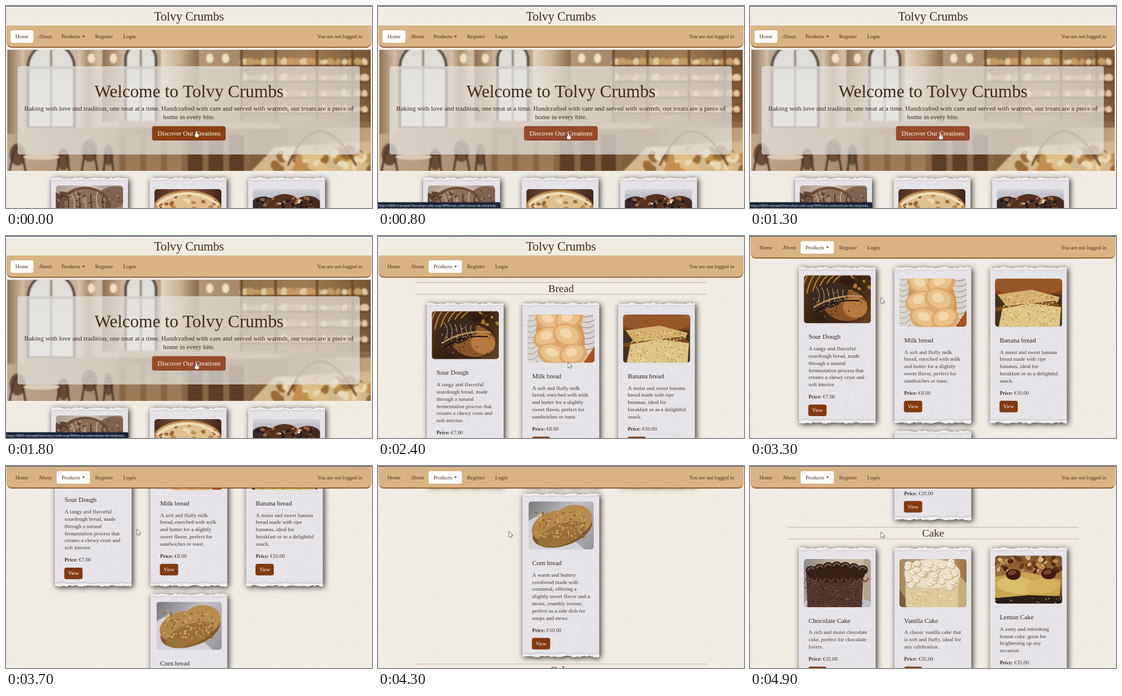
Animation of 600x332 px, one loop 5 s. Source, as an HTML page with a canvas:

```html
<!DOCTYPE html>
<html lang="en">
<head>
<meta charset="utf-8">
<title>Tolvy Crumbs</title>
<style>
html, body { margin: 0; width: 100%; height: 100%; overflow: hidden; background: #f1ede5; }
canvas { display: block; width: 600px; height: 332px; }
</style>
</head>
<body>
<canvas id="stage" width="600" height="332"></canvas>
<script>
const W = 600, H = 332, LOOP = 5000, STEP = 100;
const SERIF = '"Liberation Serif", "Noto Serif", serif';
const SANS = '"Open Sans", "Noto Sans", sans-serif';
const DARK = '#412a1a', BODY = '#463a33';
const BRAND = 'Tolvy Crumbs';
const ctx = document.getElementById('stage').getContext('2d');

let seed = 7;
const rnd = () => (seed = (seed * 16807) % 2147483647) / 2147483647;
const span = (a, b) => a + (b - a) * rnd();

function layer(h, draw) {
  const cv = document.createElement('canvas');
  cv.width = W;
  cv.height = h;
  draw(cv.getContext('2d'));
  return cv;
}

function text(c, str, x, y, size, color = BODY, align = 'left', weight = '', family = SERIF) {
  c.font = `${weight} ${size}px ${family}`;
  c.fillStyle = color;
  c.textAlign = align;
  c.fillText(str, x, y);
}

function box(c, x, y, w, h, color, r = 0) {
  c.beginPath();
  c.roundRect(x, y, w, h, r);
  c.fillStyle = color;
  c.fill();
}

function blob(c, x, y, rx, ry, color, turn = 0) {
  c.beginPath();
  c.ellipse(x, y, rx, ry, turn, 0, 7);
  c.fillStyle = color;
  c.fill();
}

function curve(c, color, width, x0, y0, cx, cy, x1, y1) {
  c.beginPath();
  c.moveTo(x0, y0);
  c.quadraticCurveTo(cx, cy, x1, y1);
  c.strokeStyle = color;
  c.lineWidth = width;
  c.stroke();
}

function poly(c, color, ...p) {
  c.beginPath();
  for (let i = 0; i < p.length; i += 2) c.lineTo(p[i], p[i + 1]);
  c.closePath();
  c.fillStyle = color;
  c.fill();
}

function fade(c, x0, y0, x1, y1, ...colors) {
  const g = c.createLinearGradient(x0, y0, x1, y1);
  colors.forEach((k, i) => g.addColorStop(i / (colors.length - 1), k));
  return g;
}

function specks(c, n, x, y, w, h, size, ...colors) {
  for (let i = 0; i < n; i++) {
    const r = span(size / 2, size);
    blob(c, x + w * rnd(), y + h * rnd(), r, r * .7, colors[i % colors.length], rnd() * 3);
  }
}

function grain(c, n, x, y, w, h, alpha) {
  for (let i = 0; i < n; i++) {
    c.fillStyle = i % 2 ? `rgba(90,75,60,${alpha})` : `rgba(255,255,255,${alpha * 4})`;
    c.fillRect(x + Math.floor(rnd() * w), y + Math.floor(rnd() * h), 1, 1);
  }
}

// Pictures, each painted in a 110 x 79 area
const pics = {
  sour(c) {
    box(c, 0, 0, 110, 79, fade(c, 0, 0, 110, 79, '#5a3718', '#2f1c10', '#6b4522'));
    for (let i = 0; i < 6; i++) curve(c, '#b5853c', 2, i * 9 - 4, 30, i * 9, 10, i * 11 + 6, 0);
    specks(c, 14, 80, 0, 30, 24, 5, '#a87832', '#4a2c14');
    blob(c, 57, 46, 49, 32, '#3a2415', .15);
    blob(c, 68, 49, 37, 26, '#8a5527', .15);
    blob(c, 84, 53, 20, 17, '#b57b3c', .2);
    blob(c, 40, 34, 34, 20, '#38291f', -.35);
    for (let i = 0; i < 6; i++) curve(c, '#a59076', 1.2, 20 + i * 9, 19 + i, 30 + i * 6, 30, 22 + i * 10, 46);
    curve(c, '#c29560', 2.5, 16, 53, 52, 30, 96, 35);
    curve(c, '#1d120b', 2, 20, 60, 50, 38, 92, 42);
    specks(c, 60, 12, 24, 92, 48, 1.4, '#c59257', '#2a1a10');
  },
  milk(c) {
    box(c, 0, 0, 110, 79, '#d9d5d0');
    for (let i = 0; i < 10; i++) {
      curve(c, '#99958f', 1.2, 86, i * 9 - 8, 100, i * 9 - 2, 110, i * 9 - 10);
      curve(c, '#aaa59e', 1.2, 0, i * 9, 8, i * 9 + 6, 18, i * 9 - 6);
    }
    poly(c, '#a8521f', 92, 79, 110, 52, 110, 79);
    blob(c, 54, 38, 39, 53, '#cf9658', -.25);
    [[36, 10, 25, 17, .5], [68, 8, 24, 18, -.4], [34, 38, 25, 18, -.3], [66, 35, 25, 20, .4],
     [43, 66, 27, 18, .3], [75, 66, 23, 18, -.3]].forEach(([x, y, a, b, t]) => {
      blob(c, x, y, a, b, '#dca86b', t);
      blob(c, x - 1, y - 2, a * .8, b * .75, '#e9c08a', t);
      blob(c, x - 3, y - 4, a * .4, b * .4, '#f2d6ac', t);
    });
  },
  banana(c) {
    box(c, 0, 0, 110, 79, '#43301f');
    box(c, 0, 0, 110, 26, fade(c, 0, 0, 0, 28, '#a5622e', '#733a18'));
    blob(c, 55, 12, 58, 16, '#95562a');
    poly(c, '#d4b16b', 4, 26, 60, 18, 106, 30, 98, 50, 20, 47);
    poly(c, '#7d4a20', 0, 47, 98, 36, 110, 47, 110, 53, 0, 53);
    poly(c, '#dfc485', 12, 49, 60, 40, 108, 47, 106, 79, 6, 79);
    specks(c, 110, 12, 26, 84, 20, 1.7, '#e8d398', '#b58c48');
    specks(c, 120, 12, 50, 90, 28, 1.7, '#efdca8', '#bf9854');
  },
  corn(c) {
    box(c, 0, 0, 110, 79, fade(c, 0, 0, 110, 79, '#77777a', '#c4c2c6', '#959297'));
    poly(c, '#d3d1d6', 0, 32, 22, 20, 95, 79, 0, 79);
    blob(c, 57, 46, 52, 27, '#7f5a2a', -.3);
    blob(c, 40, 40, 36, 23, '#b18647', -.35);
    blob(c, 74, 31, 34, 25, '#b88c4c', -.25);
    blob(c, 56, 54, 42, 17, '#98703a', -.35);
    specks(c, 150, 12, 16, 86, 44, 2.4, '#cba564', '#8c652e', '#bb9150');
  },
  choc(c) {
    box(c, 0, 0, 110, 79, fade(c, 0, 0, 110, 40, '#8d8986', '#c3b8aa', '#d2bda0'));
    box(c, 98, 0, 12, 79, '#b5a28d');
    blob(c, 55, 76, 60, 14, '#bfc1c5');
    poly(c, '#4f352c', 4, 24, 98, 22, 95, 79, 6, 79);
    specks(c, 200, 0, 32, 96, 46, 1.4, '#8a4a34', '#526173', '#2f1d19');
    blob(c, 53, 26, 47, 13, '#382019');
    for (let i = 0; i < 7; i++) {
      const x = 12 + i * 14, y = 19 - Math.sin(i * .5) * 7;
      blob(c, x, y, 9, 8, '#33201b');
      curve(c, '#7d5e50', 2, x - 6, y, x, y - 9, x + 6, y - 1);
      curve(c, '#6c4433', 2, x, 32, x + 5, 42, x + 10, 31);
    }
  },
  vanilla(c) {
    box(c, 0, 0, 110, 79, fade(c, 0, 0, 110, 0, '#a68761', '#d0b68b', '#9a7447'));
    poly(c, '#7d5d3a', 0, 50, 20, 79, 0, 79);
    poly(c, '#c8ac7d', 90, 18, 110, 40, 110, 79, 88, 79);
    box(c, 10, 22, 86, 60, '#dcc99c', 8);
    blob(c, 54, 24, 46, 24, '#e9dfc5');
    for (let i = 0; i < 44; i++) {
      const x = span(14, 94), y = span(3, 48);
      blob(c, x, y, 6, 5, '#cdb98e');
      blob(c, x - 1, y - 1, 5, 4, '#f3ebd8');
      curve(c, '#bda77a', .7, x - 3, y, x, y - 4, x + 2, y + 1);
    }
    specks(c, 60, 14, 48, 78, 30, 2, '#eadfbd', '#cdb583');
  },
  lemon(c) {
    box(c, 0, 0, 110, 79, fade(c, 0, 0, 0, 79, '#7a5030', '#a6793f', '#2e2018'));
    poly(c, '#cba552', 0, 35, 50, 27, 108, 40, 106, 66, 0, 72);
    blob(c, 36, 49, 33, 14, '#dcbd6c', .1);
    blob(c, 78, 50, 28, 12, '#d4b25d', -.1);
    poly(c, '#2b1d17', 0, 70, 55, 65, 110, 67, 110, 79, 0, 79);
    specks(c, 44, 0, 0, 110, 28, 6, '#6d3c1c', '#b98a4c', '#4b2714', '#d3b27a');
    [[30, 31], [88, 30]].forEach(([x, y]) => {
      blob(c, x, y, 12, 9, '#3d1b0e');
      blob(c, x - 2, y - 3, 7, 4, '#7b4325', -.3);
    });
    specks(c, 26, 0, 68, 110, 10, 2, '#8a6a45', '#16100d');
  },
  cookies(c) {
    box(c, 0, 0, 110, 79, fade(c, 0, 0, 110, 0, '#a99a8c', '#cfc5b9', '#8f8071'));
    blob(c, 92, 20, 26, 18, '#7d6350', -.2);
    blob(c, 10, 30, 20, 20, '#5d4434');
    blob(c, 48, 34, 42, 32, '#6d4f3b');
    blob(c, 48, 30, 34, 24, '#8d6f58');
    for (let i = 0; i < 7; i++) curve(c, i % 2 ? '#c0a68d' : '#4d3425', 1.8, 14 + i * 11, 18 - i % 3 * 4, 24 + i * 8, 20, 20 + i * 10, 44);
    specks(c, 60, 0, 8, 110, 34, 2, '#4a3224', '#b39a83');
  },
  pie(c) {
    box(c, 0, 0, 110, 79, fade(c, 0, 0, 110, 0, '#4a2c20', '#7d5a42', '#3e2419'));
    blob(c, 54, 32, 56, 30, '#bd8a50');
    blob(c, 54, 27, 50, 22, '#dfbf91');
    specks(c, 22, 10, 10, 90, 26, 5, '#9a6534', '#edd7b3', '#c08c50');
    curve(c, '#efdcba', 4, 4, 26, 54, -12, 106, 26);
  },
  muffins(c) {
    box(c, 0, 0, 110, 79, fade(c, 0, 0, 0, 36, '#d3d5da', '#8b8f9c'));
    blob(c, 18, 32, 24, 20, '#3a2a2a');
    blob(c, 52, 28, 26, 20, '#54301f');
    blob(c, 90, 31, 24, 20, '#41291f');
    specks(c, 46, 4, 14, 100, 20, 4, '#1d1a22', '#9a633b', '#5d3823');
    specks(c, 10, 20, 12, 70, 12, 3, '#c39a72', '#e2d6cb');
  }
};

function photo(c, name, x, y, w = 110) {
  c.save();
  c.beginPath();
  c.roundRect(x, y, w, 79, 5);
  c.clip();
  c.translate(x, y);
  c.scale(w / 110, 1);
  pics[name](c);
  c.restore();
}

// Uneven ripple of a torn edge
const tear = x => Math.sin(x * .19 + 1) * .7 + Math.sin(x * .43 + 2 * Math.sin(x * .11)) * .6 + Math.sin(x * 1.37 + Math.sin(x * .3)) * .4;

function edge(c, x, y, w, dy) {
  c.beginPath();
  for (let i = 0; i <= w; i++) c.lineTo(x + i, y + dy + tear(x + i + dy * 5));
}

function paper(c, x, y, w, h) {
  c.save();
  c.beginPath();
  for (let i = 0; i <= w; i++) c.lineTo(x + i, y + tear(x + i));
  for (let i = w; i >= 0; i--) c.lineTo(x + i, y + h + tear(x + i + 9));
  c.closePath();
  c.fillStyle = '#e6e4e8';
  c.shadowColor = 'rgba(20,16,14,.9)';
  c.shadowBlur = 10;
  c.shadowOffsetX = c.shadowOffsetY = 2;
  c.fill();
  c.shadowColor = 'transparent';
  c.clip();
  grain(c, 5000, x, y, w, h, .06);
  [[0, 4, '#f3f2f1'], [4, .8, '#c3c1c3'], [h, 5, '#f3f2f1'], [h - 5, 1, '#bab8ba']].forEach(([dy, lw, col]) => {
    edge(c, x, y, w, dy);
    c.lineWidth = lw;
    c.strokeStyle = col;
    c.stroke();
  });
  c.restore();
}

function button(c, x, y, w, h, color) {
  box(c, x, y, w, h, '#7a3a14', 3.5);
  box(c, x + .7, y + .7, w - 1.4, h - 1.4, color, 3);
}

// y is the top of the picture
function card(c, x, y, top, h, pic, title, price, lines) {
  paper(c, x, top, 126, h);
  if (pic === 'corn') photo(c, pic, x + 10, y, 107);
  else photo(c, pic, x + 8.2, y);
  const tx = x + 16, rows = lines.split('|');
  text(c, title, tx, y + 104.5, 10.8, '#2f2521');
  rows.forEach((s, i) => text(c, s, tx, y + 123.3 + i * 11.9, 8.95));
  const py = y + 131 + rows.length * 11.9;
  text(c, 'Price:', tx, py, 8.4, '#3a2c25', 'left', 'bold');
  text(c, price, tx + c.measureText('Price: ').width, py, 8.8);
  button(c, tx - .5, py + 10, 30, 19, '#83390f');
  text(c, 'View', tx + 14.5, py + 22.5, 8.4, '#fff', 'center');
}

function section(c, name, y) {
  [y, y + 19.5].forEach(v => box(c, 61, v, 478, .8, '#b3a38e'));
  text(c, name, 300, y + 16, 17.6, DARK, 'center');
}

const heading = c => text(c, BRAND, 300, 24, 20, DARK, 'center');

function archWindow(c, x, w) {
  box(c, x, 60, w, 140, '#54483d', [w / 2, w / 2, 0, 0]);
  box(c, x + 4, 64, w - 8, 134, fade(c, 0, 70, 0, 198, '#dcdbd5', '#f1f0ec'), [w / 2, w / 2, 0, 0]);
  box(c, x + w / 2 - 1.5, 64, 3, 134, '#8a7d6e');
  box(c, x, 100, w, 3, '#8a7d6e');
}

function interior(c) {
  box(c, 0, 70, W, 204, fade(c, 0, 0, W, 0, '#b9a48d', '#cdbca6', '#b59a7c', '#9c7a58', '#8a6848'));
  box(c, 0, 200, W, 74, fade(c, 0, 0, W, 0, '#bfa88e', '#a98c6e', '#7f5a3a', '#85603e', '#c4a57c'));
  box(c, 2, 70, 28, 140, fade(c, 2, 0, 30, 0, '#8d7157', '#d6c3a8'));
  archWindow(c, 34, 80);
  archWindow(c, 194, 54);
  box(c, 118, 70, 34, 130, fade(c, 118, 0, 152, 0, '#d9c9b2', '#a98c6c', '#d4c0a4'));
  box(c, 158, 70, 30, 120, fade(c, 158, 0, 188, 0, '#8f7052', '#c4a98a'));
  box(c, 254, 70, 62, 125, fade(c, 254, 0, 316, 0, '#e4d7c2', '#c8b08e', '#8b6a49'));
  [140, 176, 334, 360].forEach(x => blob(c, x, 86, 6, 8, '#efe0c0'));
  box(c, 384, 70, 214, 120, fade(c, 384, 0, 598, 0, '#90704f', '#a07b53', '#7a5535'));
  [97, 123, 149, 175].forEach(y => {
    for (let x = 390; x < 598; x += 11) blob(c, x, y - 5, span(4, 8), span(4, 8), x % 3 ? '#c59a64' : '#e2c8a0', span(-.4, .4));
    box(c, 384, y, 214, 3, '#66472b');
  });
  [384, 440, 508, 566].forEach(x => box(c, x, 70, 4, 120, '#6a4a2e'));
  poly(c, '#8a6544', 186, 188, 400, 200, 400, 274, 186, 274);
  poly(c, '#b3977a', 186, 188, 450, 194, 450, 202, 186, 200);
  for (let x = 196; x < 400; x += 34) box(c, x, 212, 24, 62, x > 290 ? '#5d3d24' : '#9d7a58');
  [[6, 232, 26], [84, 240, 20], [124, 226, 26], [160, 232, 16]].forEach(([x, y, w]) => {
    blob(c, x + w / 2, y + 12, w / 2, 18, '#6a4c35');
    curve(c, '#4b3424', 3, x, 272, x + w / 2, y - 40, x + w, 272);
  });
  blob(c, 58, 248, 30, 5, '#d9cbb8');
  poly(c, '#d2b78f', 400, 274, 440, 232, 598, 222, 598, 274);
  specks(c, 50, 440, 236, 158, 36, 12, '#c1904f', '#dfbd86', '#9a6a38', '#ead7b5');
  curve(c, '#5a4534', 3, 462, 262, 512, 150, 574, 262);
}

function hero(c) {
  c.save();
  c.beginPath();
  c.rect(2, 72, 596, 199);
  c.clip();
  c.filter = 'blur(1.2px)';
  c.drawImage(layer(H, interior), 0, 0);
  c.restore();
  box(c, 19, 99, 561, 145, 'rgba(228,226,224,.72)', 4);
  text(c, 'Welcome to ' + BRAND, 300, 150, 28.8, DARK, 'center');
  text(c, 'Baking with love and tradition, one treat at a time. Handcrafted with care and served with warmth, our treats are a piece of', 300, 171.5, 11.03, '#3d2a20', 'center');
  text(c, 'home in every bite.', 300, 186, 11.03, '#3d2a20', 'center');
}

const back = layer(H, c => {
  box(c, 0, 0, W, H, '#f0ece4');
  grain(c, 20000, 0, 0, W, H, .025);
});

const home = layer(H, c => {
  heading(c);
  hero(c);
  [['cookies', 74, 295], ['pie', 235.5, 301], ['muffins', 397, 301]].forEach(([pic, x, y]) => {
    paper(c, x, 283, 126, 90);
    photo(c, pic, x + 7.7, y);
  });
});

const shop = layer(920, c => {
  heading(c);
  section(c, 'Bread', 76);
  card(c, 80, 123.5, 111, 255, 'sour', 'Sour Dough', '€7.00', 'A tangy and flavorful|sourdough bread, made|through a natural|fermentation process that|creates a chewy crust and|soft interior.');
  card(c, 236.8, 129.2, 111, 255, 'milk', 'Milk bread', '€8.00', 'A soft and fluffy milk|bread, enriched with milk|and butter for a slightly|sweet flavor, perfect for|sandwiches or toast.');
  card(c, 393.5, 129.2, 111, 255, 'banana', 'Banana bread', '€10.00', 'A moist and sweet banana|bread made with ripe|bananas, ideal for|breakfast or as a delightful|snack.');
  card(c, 236.8, 392.3, 380, 267, 'corn', 'Corn bread', '€10.00', 'A warm and buttery|cornbread made with|cornmeal, offering a|slightly sweet flavor and a|moist, crumbly texture,|perfect as a side dish for|soups and stews.');
  section(c, 'Cake', 659);
  card(c, 80, 712, 694, 240, 'choc', 'Chocolate Cake', '€35.00', 'A rich and moist chocolate|cake, perfect for chocolate|lovers.');
  card(c, 236.8, 712, 694, 240, 'vanilla', 'Vanilla Cake', '€35.00', 'A classic vanilla cake that|is soft and fluffy, ideal for|any celebration.');
  card(c, 393.5, 706.3, 694, 240, 'lemon', 'Lemon Cake', '€35.00', 'A zesty and refreshing|lemon cake, great for|brightening up any|occasion.');
});

function navbar(c, y, active) {
  box(c, 1.5, y, 597, 36.5, '#8a4b1d', [0, 0, 8, 8]);
  box(c, 1.5, y, 597, 35, '#d9b384', [0, 0, 8, 8]);
  if (active === 'Home') box(c, 7.5, y + 8, 37.5, 20.5, '#fffdfa', 3);
  else box(c, 83, y + 8, 54.5, 20.5, '#fffdfa', 3);
  [['Home', 15.5], ['About', 53.5], ['Products', 91], ['Register', 146], ['Login', 192]]
    .forEach(([s, x]) => text(c, s, x, y + 21, 8.75, '#4b301f'));
  poly(c, '#4b301f', 124.8, y + 17, 129.4, y + 17, 127.1, y + 19.4);
  text(c, 'You are not logged in', 584, y + 21, 8.6, '#4b301f', 'right');
}

function pointer(c, x, y, shape) {
  c.save();
  c.translate(x, y);
  c.beginPath();
  if (shape === 'hand') {
    c.roundRect(-1.2, 0, 2.2, 7, 1);
    c.roundRect(-2.6, 4, 6.4, 5.5, 2);
  } else {
    [[0, 0], [0, 8.2], [1.9, 6.6], [3.1, 9.2], [4.4, 8.6], [3.2, 6.1], [5.6, 5.9]].forEach(p => c.lineTo(...p));
    c.closePath();
  }
  c.strokeStyle = '#4d4a4a';
  c.lineWidth = 1.2;
  c.stroke();
  c.fillStyle = '#fff';
  c.fill();
  c.restore();
}

// Linear track through [time, value] pairs
function track(t, keys) {
  for (let i = 1; i < keys.length; i++) {
    const [a, u] = keys[i - 1], [b, v] = keys[i];
    if (t <= b) return u + (v - u) * Math.max(0, (t - a) / (b - a));
  }
  return keys[keys.length - 1][1];
}

function drawHome(t) {
  ctx.drawImage(home, 0, 0);
  button(ctx, 239.5, 197.5, 120.5, 23.5, t < 100 ? '#8a3f13' : '#984a2a');
  text(ctx, 'Discover Our Creations', 300, 213, 10.9, '#fff', 'center');
  navbar(ctx, 32, 'Home');
  if (t >= 300) {
    box(ctx, 0, 322.5, 200.5, 10, '#182338', [0, 2, 0, 0]);
    text(ctx, 'https://8000-marlowek7eta-tolvycrumb-ouzp78f9hsl.ws.codeinstitute-ide.net/produ...', 1, 329.5, 4.96, '#fff', 'left', '', SANS);
  }
  pointer(ctx, 312.5, t < 100 ? 206 : 209.5, 'hand');
}

function drawShop(t) {
  const scroll = Math.round(track(t, [[3050, 0], [3300, 59], [4300, 334], [4900, 559]]));
  ctx.drawImage(shop, 0, -scroll);
  navbar(ctx, Math.max(.5, 32 - scroll), 'Products');
  pointer(ctx, track(t, [[2400, 312], [3000, 215]]),
    track(t, [[2400, 208], [3000, 102], [3300, 102], [4300, 108], [4900, 109]]), 'arrow');
}

let start;
function tick(now) {
  start ??= now;
  const t = Math.floor(((now - start) % LOOP) / STEP) * STEP;
  ctx.drawImage(back, 0, 0);
  if (t < 2200) drawHome(t);
  else drawShop(t);
  box(ctx, 0, 0, W, 1, '#3d5470');
  requestAnimationFrame(tick);
}
tick(performance.now());
</script>
</body>
</html>
```
